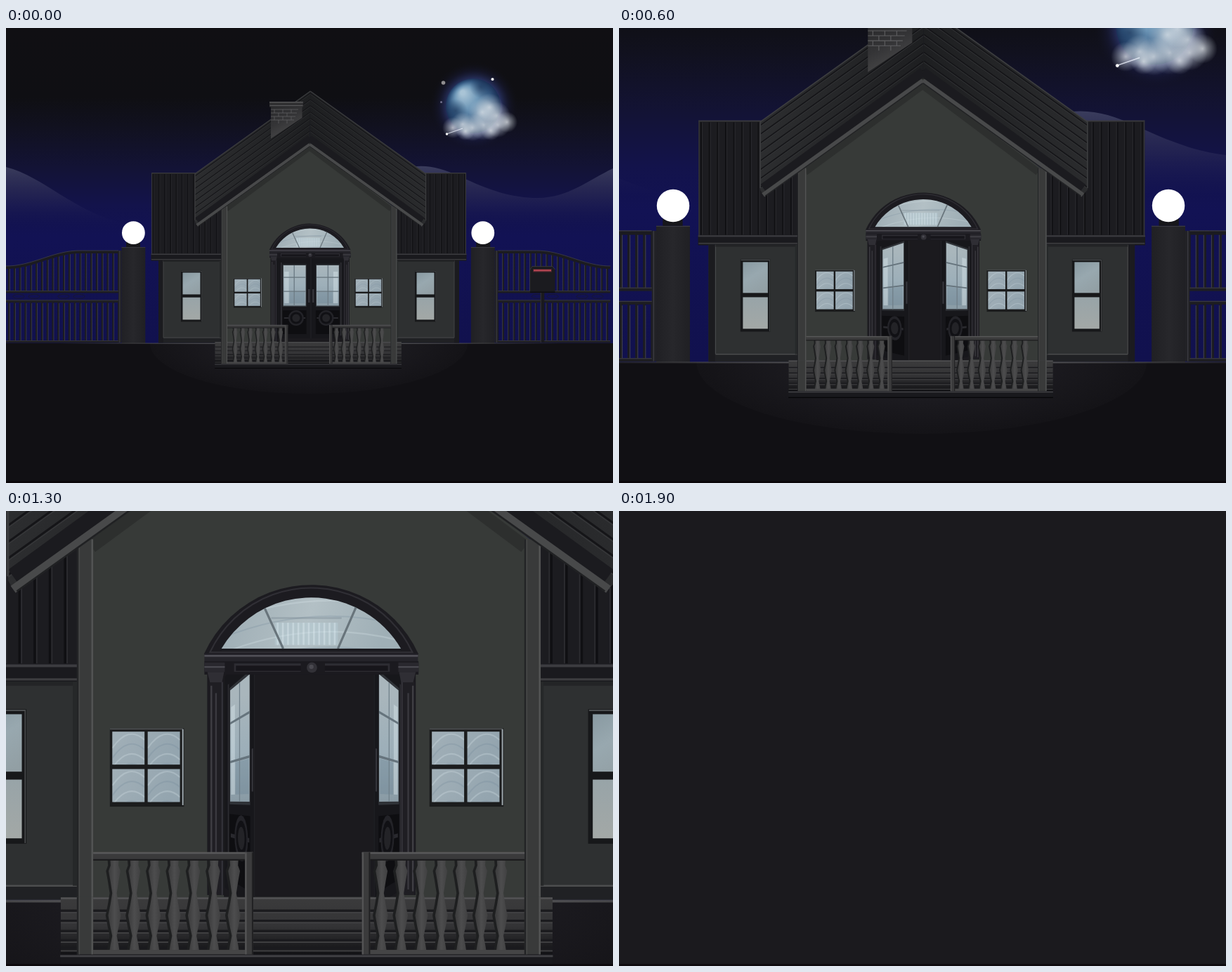
Recreate the animation shown at these times as an HTML page with a canvas. Size 864x648 px, loop 2100 ms.

```html
<!DOCTYPE html>
<html lang="en">
<head>
<meta charset="utf-8">
<title>House at night</title>
<style>
html, body { margin: 0; width: 100%; height: 100%; overflow: hidden; background: #111014; }
canvas { display: block; }
</style>
</head>
<body>
<canvas id="stage" width="864" height="648"></canvas>
<script>
const c = document.getElementById('stage').getContext('2d');
const LOOP = 2100, STEP = 100, LAST = 19;
const EYE = { x: 431.5, y: 384.4 };
const DARK = '#1b1a1e';

// step, camera distance, visible width of a door leaf
const keys = [[0, 1, 49], [4, .8025, 38], [6, .7055, 32.4], [9, .574, 26.3],
  [13, .379, 16.1], [15, .281, 9.4], [18, .134, 3]];

function pose(step) {
  const i = Math.max(1, keys.findIndex(k => k[0] >= step));
  const a = keys[i - 1], b = keys[i], f = (step - a[0]) / (b[0] - a[0]);
  return { distance: a[1] + (b[1] - a[1]) * f, leafWidth: a[2] + (b[2] - a[2]) * f };
}

function box(x0, y0, x1, y1, fill) {
  c.fillStyle = fill;
  c.fillRect(x0, y0, x1 - x0, y1 - y0);
}
function trace(points) {
  c.beginPath();
  points.forEach(([x, y]) => c.lineTo(x, y));
}
function poly(points, fill) {
  trace(points);
  c.closePath();
  c.fillStyle = fill;
  c.fill();
}
function line(points, color, width = 1) {
  trace(points);
  c.strokeStyle = color;
  c.lineWidth = width;
  c.stroke();
}
function disc(x, y, r, fill) {
  c.beginPath();
  c.arc(x, y, r, 0, 7);
  c.fillStyle = fill;
  c.fill();
}
function stops(g, colors) {
  colors.forEach(([at, color]) => g.addColorStop(at, color));
  return g;
}
const spread = colors => colors.map((color, i) => [i / (colors.length - 1), color]);
const fade = (x0, y0, x1, y1, ...colors) =>
  stops(c.createLinearGradient(x0, y0, x1, y1), spread(colors));
const glow = (x, y, r0, r, ...colors) =>
  stops(c.createRadialGradient(x, y, r0, x, y, r), spread(colors));

function scoped(draw) {
  c.save();
  draw();
  c.restore();
}
function mirrored(axis, draw) {
  draw();
  scoped(() => {
    c.translate(2 * axis, 0);
    c.scale(-1, 1);
    draw();
  });
}

function sky() {
  const g = c.createLinearGradient(0, 0, 0, 450);
  box(0, 0, 864, 450, stops(g, [[0, '#100f13'], [.22, '#0f0f13'], [.31, '#11111f'],
    [.44, '#131335'], [.56, '#13134b'], [.66, '#121254'], [1, '#11114e']]));
  c.fillStyle = fade(0, 196, 0, 282, 'rgba(92,96,126,.55)', 'rgba(70,70,110,.28)', 'rgba(30,30,90,0)');
  c.beginPath();
  c.moveTo(0, 198);
  c.bezierCurveTo(55, 212, 95, 262, 172, 279);
  c.lineTo(230, 290);
  c.lineTo(0, 290);
  c.fill();
  c.beginPath();
  c.moveTo(540, 215);
  c.bezierCurveTo(575, 188, 610, 195, 645, 211);
  c.bezierCurveTo(690, 232, 720, 242, 757, 242);
  c.bezierCurveTo(800, 242, 830, 216, 864, 200);
  c.lineTo(864, 290);
  c.lineTo(540, 290);
  c.fill();
}

function moon() {
  disc(666, 111, 64, glow(666, 111, 36, 64, 'rgba(64,84,170,.6)', 'rgba(30,34,80,.3)', 'rgba(15,15,20,0)'));
  const g = c.createRadialGradient(650, 92, 3, 665, 111, 40);
  disc(665, 111, 39, stops(g, [[0, '#a9c4d6'], [.35, '#6f98b8'], [.7, '#365b83'], [1, '#172b50']]));
  scoped(() => {
    c.beginPath();
    c.arc(665, 111, 39, 0, 7);
    c.clip();
    disc(676, 84, 16, glow(676, 84, 0, 16, 'rgba(20,42,78,.55)', 'rgba(20,42,78,0)'));
    disc(640, 118, 17, glow(640, 118, 0, 17, 'rgba(22,48,84,.6)', 'rgba(22,48,84,0)'));
  });
  const puffs = [[636, 142, 15], [650, 137, 17], [664, 142, 19], [680, 138, 22], [678, 120, 20],
    [688, 113, 20], [698, 125, 20], [700, 138, 18], [713, 134, 15], [654, 147, 13], [690, 146, 14]];
  puffs.forEach(([x, y, r]) => disc(x, y, r,
    glow(x, y, 0, r, 'rgba(232,237,240,.7)', 'rgba(215,224,230,.35)', 'rgba(200,210,220,0)')));
  disc(622.5, 78, 2.8, '#8f8d90');
  disc(692.5, 73, 2.1, '#eeeeee');
  disc(619.5, 105.5, 1.5, '#70708c');
  line([[627, 151], [650, 143]], 'rgba(240,244,255,.75)', 1.2);
  disc(627.5, 151, 1.7, '#fff');
}

const railTop = x => x > 105 ? 318 : 329 + 11 * Math.cos(Math.PI * x / 105);

function gateAndLamp() {
  for (let x = 3; x < 160; x += 7.8) {
    for (const [top, bottom] of [[railTop(x), 375], [389, 446]]) {
      box(x, top, x + 2.4, bottom, '#1c1c21');
      box(x + 2.2, top + 3, x + 2.9, bottom, '#45454c');
    }
  }
  const curve = Array.from({ length: 33 }, (_, i) => [i * 5, railTop(i * 5) + 1]);
  line(curve, '#1b1b20', 4);
  line(curve.map(([x, y]) => [x, y - 2]), '#46464d', .7);
  for (const y of [374, 387.5, 445]) {
    box(0, y, 163, y + 3.5, '#1d1d22');
    box(0, y, 163, y + .7, '#404047');
  }
  for (const x of [18, 40, 82, 104]) {
    c.beginPath();
    c.ellipse(x, 382.3, 8, 3, 0, 0, 7);
    c.strokeStyle = '#1a1a2b';
    c.lineWidth = .8;
    c.stroke();
  }
  box(160, 317, 164.5, 448, '#222226');
  box(161.5, 317, 162.2, 448, '#44444a');

  box(164.5, 312, 198.3, 449, fade(164, 0, 198, 0, '#202024', '#27272b', '#202024'));
  box(164.5, 312, 198.3, 312.8, '#3d3d42');
  box(171, 305, 191, 312, '#17171b');
  disc(181.4, 291.7, 16.4, '#fff');
}

function mailbox() {
  box(760.8, 376, 766.3, 448, '#1a1a1e');
  box(760.8, 376, 761.6, 448, '#3b3b40');
  poly([[746, 344], [749, 339.5], [778, 339.5], [781.5, 344], [781.5, 377], [746, 377]], '#1b1b1f');
  line([[746, 344], [749, 339.5], [778, 339.5], [781.5, 344]], '#3a3a40', .8);
  box(750, 343, 777, 348, '#3b2128');
  box(751, 344, 776, 346.5, '#b04450');
  box(746, 375.5, 781.5, 377, '#0e0e11');
}

function ground() {
  box(0, 449, 864, 660, '#111014');
  scoped(() => {
    c.beginPath();
    c.rect(0, 449, 864, 200);
    c.clip();
    c.translate(431, 449);
    c.scale(226, 72);
    disc(0, 0, 1, glow(0, 0, 0, 1, '#212026', '#1c1b20', '#141317'));
  });
  box(75, 448.4, 790, 450, fade(75, 0, 790, 0, 'rgba(80,80,82,0)', '#505052', '#505052', 'rgba(80,80,82,0)'));
}

function wing() {
  box(207, 206.5, 310, 323, '#1c1c20');
  for (let x = 209; x < 308; x += 8.2) {
    box(x, 208, x + 1.4, 321, '#101013');
    box(x + 1.4, 208, x + 2.1, 321, '#2c2c30');
  }
  box(207, 206, 270, 207.3, '#3a3a3d');
  box(207, 206, 208, 322, '#36363a');
  box(206.5, 321.5, 308, 331.5, '#1a1a1e');
  box(206.5, 321.5, 308, 323, '#3c3c40');
  box(207, 329, 308, 330.2, '#3c3c3f');

  box(217, 331, 308, 448.5, '#2e3031');
  box(217, 331, 224, 448.5, '#1b1b1f');
  box(223.6, 331, 224.4, 441, '#4a4b4c');
  box(224, 331, 308, 333, '#232426');
  box(224, 440.5, 308, 448.5, '#202124');
  box(224, 440.5, 308, 441.5, '#4d4e4f');
  box(304, 331, 307, 441, '#262829');
}

function wingWindow(x) {
  box(x, 345.7, x + 30, 418.3, '#17181a');
  box(x + .5, 346, x + 29.5, 346.7, '#505355');
  box(x + 29, 346, x + 29.6, 418, '#4a4c4e');
  box(x + 2.5, 348.4, x + 27.5, 379.4, fade(x, 348, x + 20, 380, '#8798a0', '#98a8af', '#929fa4'));
  box(x + 2.5, 383.7, x + 27.5, 415.4, fade(x, 384, x, 416, '#98a4a8', '#a3a8a6'));
}

function swirls(x, y, w, h) {
  scoped(() => {
    c.beginPath();
    c.rect(x, y, w, h);
    c.clip();
    for (let i = 0; i < 4; i++) {
      const top = y + h * (.1 + i * .3);
      c.beginPath();
      c.moveTo(x, top + h * .4);
      c.quadraticCurveTo(x + w * .5, top - h * .3, x + w, top + h * .15);
      c.strokeStyle = i % 2 ? 'rgba(105,130,148,.22)' : 'rgba(225,236,240,.24)';
      c.lineWidth = .8;
      c.stroke();
    }
  });
}

function smallWindow(x) {
  box(x, 356, x + 40, 398.3, '#1b1c1d');
  box(x, 356, x + 39.5, 356.7, '#4c4f50');
  box(x + 39, 356.5, x + 39.7, 397.5, '#a3adb2');
  for (const px of [1.3, 20.4]) for (const py of [357.8, 378]) {
    box(x + px, py, x + px + 17.4, py + 17.8, fade(x, py, x + 30, py + 18, '#a2b0b8', '#94a5af'));
    swirls(x + px, py, 17.4, 17.8);
  }
}

function frontWall() {
  poly([[307, 449], [307, 258], [432, 163], [556, 258], [556, 449]], '#373a38');
  line([[314, 258], [432, 171], [548, 258]], '#2d2f2e', 7);
}

function roofSide(edgeX, tipX, light) {
  const apex = 433.2;
  const plane = [[apex, 90], [edgeX, 207.5], [edgeX, 276], [tipX, 281], [432.3, 164]];
  scoped(() => {
    poly(plane, fade(edgeX, 0, apex, 0, light, '#1e1f21'));
    c.clip();
    for (let i = 0; i < 9; i++) {
      const y = 93 + i * 8.9;
      line([[apex, y], [edgeX, y + 118]], '#151518', 1.2);
      line([[apex, y + 1.2], [edgeX, y + 119.2]], '#353638', .6);
    }
    line([[432.3, 157], [tipX, 274]], '#1b1b1f', 9);
  });
  line([[apex, 90], [edgeX, 207.5], [edgeX, 274]], '#3c3d3f', 1.2);
  line([[432.3, 166], [tipX, 281]], '#48494a', 4.6);
  line([[432.3, 168.5], [tipX + (tipX < 432 ? 2 : -2), 282]], '#202123', 1);
}

function chimney() {
  poly([[377, 112], [421.5, 112], [421.5, 128], [377, 157.5]], fade(377, 112, 400, 156, '#2a2a2c', '#343436', '#49494a'));
  for (let row = 0; row < 4; row++) {
    const y = 116 + row * 5;
    line([[377, y], [416 - row * 2, y]], '#5e5e60', .8);
    for (let x = 382 + row % 2 * 6; x < 412; x += 12) line([[x, y], [x, y + 5]], '#5e5e60', .8);
  }
  box(375, 105, 422.8, 112.5, '#303032');
  box(375, 105, 422.8, 106.3, '#59595b');
  box(375.5, 110, 422.5, 111, '#59595b');
}

function leaf(hinge, dir, width) {
  const near = .25 * Math.sqrt(1 - (width / 49) ** 2);
  const at = (u, v) => [hinge + dir * u * width, 395 + (v - 395) * (1 + near * u)];
  const quad = (u0, v0, u1, v1, fill) => poly([at(u0, v0), at(u1, v0), at(u1, v1), at(u0, v1)], fill);
  const ring = (r, fill) => poly(Array.from({ length: 20 }, (_, i) => {
    const a = i * Math.PI / 10;
    return at(.55 + r * Math.cos(a) / 49, 413 + r * Math.sin(a));
  }), fill);

  quad(0, 328, 1, 442, '#17171b');
  quad(.1, 334, .14, 438, '#2c2c31');
  quad(.16, 336.5, .85, 397, '#2f3237');
  quad(.18, 338, .83, 395.5, fade(0, 338, 0, 396, '#a9b6bc', '#9dafb9', '#899aa4'));
  quad(.21, 347, .34, 392, 'rgba(222,234,240,.4)');
  quad(.36, 376, .8, 392, 'rgba(105,130,146,.35)');
  quad(.48, 338, .51, 395.5, '#71808a');
  for (const v of [354.5, 374.5]) quad(.18, v, .83, v + 1.2, '#66747d');
  quad(.16, 402, .85, 436, '#0e0e11');
  quad(.2, 412, .82, 414, '#29292e');
  ring(11, '#232328');
  ring(8.5, '#111115');
  ring(5.5, '#232327');
  quad(.9, 372, .95, 391, '#35353b');
  quad(.985, 328, 1, 442, '#28282d');
}

// Circle segment standing on a level chord
function segment(half, height, base) {
  const r = (half * half + height * height) / (2 * height);
  const cy = base - height + r;
  const a = Math.asin(half / r);
  c.beginPath();
  c.arc(432.6, cy, r, -Math.PI / 2 - a, -Math.PI / 2 + a);
  c.closePath();
}

function archWindow() {
  segment(57.9, 37.4, 316);
  c.fillStyle = '#1c1b20';
  c.fill();
  segment(54.6, 34.8, 315);
  c.strokeStyle = '#302f35';
  c.lineWidth = .8;
  c.stroke();
  scoped(() => {
    segment(48.4, 27.6, 313);
    c.fillStyle = fade(390, 290, 470, 313, '#a0afb6', '#b3c0c5', '#9fafb6');
    c.fill();
    c.clip();
    swirls(384, 285, 97, 28);
    box(411, 296, 449, 297, 'rgba(120,136,145,.4)');
    box(413, 299, 447, 311, 'rgba(190,214,226,.3)');
    for (let x = 414; x < 447; x += 2.8) box(x, 299, x + 1, 311, 'rgba(230,241,246,.35)');
    line([[406.5, 289], [417.5, 313]], '#68747b', 1.2);
    line([[457.5, 289], [447, 313]], '#68747b', 1.2);
  });
}

function door(width) {
  box(376.5, 316, 489, 446, '#1b1a1f');
  box(385.5, 327, 480.5, 447, DARK);
  scoped(() => {
    c.beginPath();
    c.rect(386, 327, 96, 120);
    c.clip();
    leaf(386, 1, width);
    leaf(482.6, -1, width);
  });
  archWindow();
  mirrored(433.1, () => {
    box(377.7, 331, 385.2, 446, '#1f1e23');
    box(378.3, 333, 379.2, 444, '#3f3e44');
    box(380.8, 337, 381.7, 443, '#3a393f');
    box(384.2, 331, 385, 446, '#34333a');
  });
  box(375, 315.8, 490.2, 320, '#25242a');
  box(375, 316.4, 490.2, 317.4, '#504f56');
  box(375, 319.8, 490.5, 327, '#1b1a1f');
  box(391, 321, 475, 325.5, '#2d2c32');
  box(392, 322.2, 474, 325, '#17161b');
  box(427, 320.5, 440, 326, '#1b1a1f');
  disc(433, 323.2, 2.8, '#323137');
  disc(432.7, 322.8, 1.2, '#4a4950');
  mirrored(432.8, () => {
    box(375, 320.5, 386, 325.5, '#29282e');
    box(375, 322.5, 386, 323.3, '#4b4a51');
    poly([[376.6, 325.6], [385.6, 325.6], [384.5, 331.2], [378, 331.2]], '#2f2e34');
  });
}

function porch() {
  box(297.5, 447.3, 562.8, 478, fade(0, 447, 0, 478, '#3b3b3c', '#343436', '#121215'));
  for (const y of [454.8, 460.3, 465.8, 470.8, 475.5]) {
    box(297.5, y - 1, 562.8, y + .3, '#1b1b1e');
    box(297.5, y + .3, 562.8, y + 1, '#414143');
  }
  box(297.5, 447.3, 562.8, 448.2, '#535355');
  box(297.2, 478, 563, 484.5, '#19191d');
  box(297.2, 478.4, 563, 479.5, '#404044');
  box(297.2, 484, 563, 485, '#08080a');
}

function baluster(x) {
  const profile = [[427, 2.3], [430, 2.1], [433, 3.2], [438, 2.3], [445, 1.2], [451, 2.2],
    [457, 3.4], [463, 2.3], [468, 1.2], [473, 2.2], [477, 2.8]];
  const side = s => profile.map(([y, r]) => [x + s * r, y]);
  const shape = [...side(-1), ...side(1).reverse()];
  poly(shape.map(([px, y]) => [px - 1.4, y]), '#1e1f20');
  poly(shape, fade(x - 3, 0, x + 3, 0, '#3c3c3d', '#4d4d4e', '#414142'));
}

function railing(x0, x1, postX, first) {
  for (let i = 0; i < 7; i++) baluster(first + i * 10.75);
  box(x0, 423, x1, 426.8, '#3a3a3b');
  box(x0, 422.8, x1, 423.8, '#585859');
  box(x0, 426.6, x1, 427.4, '#1b1b1d');
  box(x0, 475.6, x1, 478, '#454546');
  box(postX, 423, postX + 4.4, 478, '#3b3b3c');
  box(postX, 423, postX + .9, 478, '#545455');
  box(postX + 3.7, 423, postX + 4.4, 478, '#202022');
}

function column(x) {
  box(x, 254, x + 8.8, 478, '#393a3a');
  box(x, 254, x + 1, 478, '#232426');
  box(x + 1, 254, x + 1.6, 478, '#484949');
  box(x + 7.8, 254, x + 8.8, 478, '#525353');
}

function scene(leafWidth) {
  sky();
  moon();
  mirrored(430.1, gateAndLamp);
  mailbox();
  ground();
  mirrored(431, wing);
  wingWindow(249);
  wingWindow(582);
  frontWall();
  column(306.2);
  column(547.6);
  roofSide(269, 271.8, '#2c2d2f');
  roofSide(597.5, 593, '#2a2b2d');
  chimney();
  smallWindow(324);
  smallWindow(496.4);
  door(leafWidth);
  porch();
  railing(315, 401.3, 396.9, 326.5);
  railing(460, 547.7, 460, 470.6);
  scoped(() => {
    c.beginPath();
    c.rect(290, 447, 280, 40);
    c.clip();
    column(306.2);
    column(547.6);
  });
}

function draw(step) {
  c.setTransform(1, 0, 0, 1, 0, 0);
  if (step >= LAST) {
    box(0, 0, 864, 648, DARK);
  } else {
    const { distance, leafWidth } = pose(step);
    const s = 1 / distance;
    c.setTransform(s, 0, 0, s, EYE.x * (1 - s), EYE.y * (1 - s));
    scene(leafWidth);
    c.setTransform(1, 0, 0, 1, 0, 0);
  }
  box(0, 645, 864, 648, 'rgba(8,2,6,.6)');
}

let shown = -1;
const start = performance.now();
function tick() {
  const t = (performance.now() - start) % LOOP;
  const step = Math.min(LAST, Math.floor(t / STEP));
  if (step !== shown) draw(shown = step);
  requestAnimationFrame(tick);
}
tick();
</script>
</body>
</html>
```
